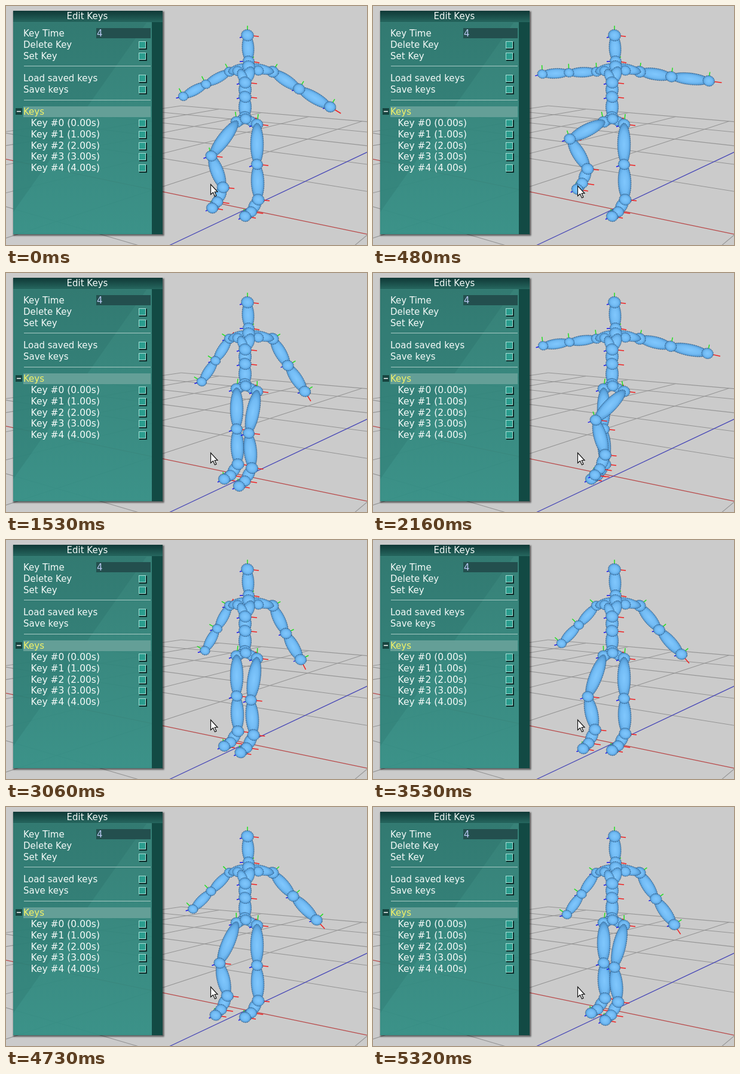
Animation, 604 px wide and 400 px high, one loop 5420 ms. Source, as an HTML page with a canvas:

```html
<!DOCTYPE html>
<html lang="en">
<head>
<meta charset="utf-8">
<title>Edit Keys</title>
<style>
  html, body { margin: 0; width: 100%; height: 100%; overflow: hidden; background: #cbcbcb; }
  canvas, svg { position: absolute; left: 0; top: 0; width: 604px; height: 400px; }
  text { font: 15px "DejaVu Sans", sans-serif; fill: #f4faf8; }
</style>
</head>
<body>
<canvas id="scene" width="604" height="400"></canvas>
<svg id="panel" viewBox="0 0 604 400">
  <defs>
    <linearGradient id="body" x2="0" y2="1">
      <stop offset="0" stop-color="#2f7c72"/><stop offset="1" stop-color="#348f85"/>
    </linearGradient>
    <linearGradient id="bar" x2="0" y2="1">
      <stop offset="0" stop-color="#0f3836"/><stop offset="1" stop-color="#26675f"/>
    </linearGradient>
    <filter id="soft"><feGaussianBlur stdDeviation="1.3"/></filter>
  </defs>
  <path d="M12 9H264.5V384.5H12Z M13 10V381H261V10Z" fill="#000" fill-rule="evenodd" opacity=".55" filter="url(#soft)"/>
  <rect x="12" y="8" width="250" height="374" fill="url(#body)" opacity=".95"/>
  <path d="M12 28H235L12 345Z" fill="#123c3a" opacity=".1"/>
  <rect x="244" y="27" width="18" height="355" fill="#124a44"/>
  <rect x="12" y="8" width="250" height="19" fill="url(#bar)"/>
  <rect x="151" y="37" width="91" height="17" fill="#234f4e"/>
  <path d="M30 100.5H242M30 157.5H242" stroke="#a9cbc5"/>
  <rect x="29" y="168" width="213" height="18" fill="#649f97"/>
  <rect x="16" y="171" width="11" height="11" fill="#17443f"/>
  <path d="M18 176.5H25" stroke="#fff" stroke-width="1.5"/>
</svg>
<script>
const panel = document.getElementById('panel');
const ctx = document.getElementById('scene').getContext('2d');

function add(tag, attrs, content = '') {
  const node = document.createElementNS(panel.namespaceURI, tag);
  for (const name in attrs) node.setAttribute(name, attrs[name]);
  node.textContent = content;
  panel.append(node);
}
const label = (x, y, content, style = '') => add('text', { x, y, style }, content);
function checkbox(y) {
  add('rect', { x: 223, y: y - 5, width: 13, height: 13, fill: '#0b2b29' });
  add('rect', { x: 222.5, y: y - 5.5, width: 11, height: 11, fill: '#2a9c8d', stroke: '#a5e0d6' });
}
label(101.5, 22, 'Edit Keys');
label(29, 51, 'Key Time');
label(152, 51, '4', 'fill:#b9c9f2');
label(29, 182, 'Keys', 'fill:#f3f266');
[['Delete Key', 65], ['Set Key', 84], ['Load saved keys', 121], ['Save keys', 140]].forEach(([name, y]) => {
  label(29, y + 5, name);
  checkbox(y);
});
for (let i = 0; i < 5; i++) {
  const y = 196 + i * 18.75;
  label(41.5, y + 5, `Key #${i} (${i}.00s)`, 'font-size:15.5px');
  checkbox(Math.round(y));
}

// Perspective floor: an origin and two vanishing points.
function floor(a, b) {
  const u = a * 0.132, v = b * 0.203, w = 1 + u + v;
  return [(402 - 936 * u + 985 * v) / w, (340 + 62 * u + 65 * v) / w];
}
function line(p, q, color, width = 1) {
  ctx.strokeStyle = color;
  ctx.lineWidth = width;
  ctx.beginPath();
  ctx.moveTo(...p);
  ctx.lineTo(...q);
  ctx.stroke();
}
function drawFloor() {
  ctx.fillStyle = '#cbcbcb';
  ctx.fillRect(0, 0, 604, 400);
  for (let i = -2; i <= 5; i++) {
    if (!i) continue;
    line(floor(i, 5), floor(i, -3), '#959595', 1.1);
    if (i > -2) line(floor(5, i), floor(-4, i), '#959595', 1.1);
  }
  line(floor(5, 0), floor(-4, 0), '#b84646', 1.2);
  line(floor(0, 5), floor(0, -3), '#4646b6', 1.2);
}

function ellipsoid(x, y, rx, ry, angle) {
  ctx.save();
  ctx.translate(x, y);
  ctx.rotate(angle);
  ctx.scale(rx, ry);
  const shade = ctx.createRadialGradient(0, 0, 0, 0, 0, 1);
  [[0, '#80c7fd'], [0.6, '#72bbf4'], [0.85, '#5ea6e0'], [1, '#4785bb']].forEach(s => shade.addColorStop(...s));
  ctx.beginPath();
  ctx.arc(0, 0, 1, 0, 7);
  ctx.fillStyle = shade;
  ctx.fill();
  ctx.restore();
  ctx.setLineDash([2, 1.3]);
  ctx.lineWidth = 1;
  ctx.strokeStyle = '#2b5278cc';
  ctx.stroke();
  ctx.setLineDash([]);
}
const ball = ([x, y], r) => ellipsoid(x, y, r + 1, r, 0.3);
function bone([x1, y1], [x2, y2], r) {
  ellipsoid((x1 + x2) / 2, (y1 + y2) / 2, Math.hypot(x2 - x1, y2 - y1) / 2 + 2, r, Math.atan2(y2 - y1, x2 - x1));
}
function axes([x, y], red = [19, 2], green = [0, -16], blue = [-13, 4]) {
  [[red, '#f02020'], [green, '#20e020'], [blue, '#1414f0']].forEach(([d, color]) =>
    line([x, y], [x + d[0], y + d[1]], color, 1.5));
}
const rad = degrees => degrees * Math.PI / 180;
const mix = (p, q, k, dx = 0, dy = 0) => [p[0] + (q[0] - p[0]) * k + dx, p[1] + (q[1] - p[1]) * k + dy];

function drawTorso() {
  const neck = [406, 92], collar = [406, 101], head = [404, 49];
  const spine = [[400, 128], [400, 152], [400, 186]];
  axes(head);
  [neck, collar].forEach(p => axes(p, [18, 3], [9, -7], [-15, 1]));
  spine.forEach(p => axes(p, [20, 2], [0, 0], [-14, 3]));
  bone(head, neck, 10);
  ball(head, 9.5);
  bone(collar, [374, 110], 8);
  bone(collar, [446, 110], 8);
  ball([388, 109], 8);
  ball([422, 108], 8);
  ball(neck, 8.5);
  ball(collar, 9.5);
  bone([411, 104], spine[0], 9.5);
  bone([391, 108], spine[0], 7.5);
  bone(spine[0], spine[1], 10.5);
  bone(spine[1], spine[2], 10.5);
  spine.forEach(p => ball(p, 9.5));
}

function drawArm(shoulder, side, elbowPolar, handPolar, r) {
  const at = ([deg, len]) => [shoulder[0] + side * len * Math.cos(rad(deg)), shoulder[1] + len * Math.sin(rad(deg))];
  const elbow = at(elbowPolar), hand = at(handPolar);
  const c = Math.cos(rad(handPolar[0])), s = Math.sin(rad(handPolar[0]));
  const reach = 16 + 6 * c;
  const along = side > 0 ? [reach * c, reach * s] : [13 * c, -13 * s];
  [shoulder, elbow, hand].forEach(p => axes(p, along, [15 * side * s, -15 * c], [-12, 3]));
  bone(shoulder, elbow, r);
  bone(elbow, hand, r);
  ball(shoulder, r - 0.5);
  ball(elbow, r - 1);
  ball(hand, r - 1);
}

// Each joint: rest x, y, then sine and cosine weights for x and for y.
function drawLeg(hip, joints, lift) {
  const s = Math.sin(rad(75 * lift)), q = 1 - Math.cos(rad(75 * lift));
  const [knee, ankle, toe] = joints.map(([x, y, ax, bx, ay, by]) => [x + ax * s + bx * q, y + ay * s + by * q]);
  const heel = mix(ankle, toe, 0.58, 1, 4);
  axes(hip, [19, 2], [2 - 6 * s, -17]);
  axes(knee, [19, 2], [-5 * s, -14]);
  axes(ankle, [19, 2], [0, 0], [0, 0]);
  axes(heel, [20, 3], [0, 0], [0, 0]);
  axes(toe, [18, 3], [-2, -12], [-11, 5]);
  ball(hip, 9);
  bone(hip, knee, 10.8);
  bone(knee, ankle, 10.8);
  ball(knee, 8.7);
  bone(ankle, heel, 9.5);
  ball(ankle, 9.2);
  bone(heel, toe, 8.5);
  ball(heel, 8.5);
  ball(toe, 8.7);
}
const legA = [[386, 261, -60, 0, 23.5, -90.5], [388, 320, -41, 14.5, 15, -92], [365, 345, -33.5, 12.7, 34, -105]];
const legB = [[420, 265, -50, -3, 20, -63], [422, 324, -38, 2, 17, -60], [400, 352, -38, 10, 26, -64]];

function drawCursor(x, y) {
  ctx.beginPath();
  [[0, 0], [0, 17], [4, 13.5], [7, 20], [9.5, 19], [6.7, 12.5], [11.5, 12.5]]
    .forEach(([dx, dy]) => ctx.lineTo(x + dx, y + dy));
  ctx.closePath();
  ctx.fillStyle = '#fff';
  ctx.fill();
  ctx.strokeStyle = '#111';
  ctx.lineWidth = 1.2;
  ctx.stroke();
}

// Pose updates come in bursts: first time, last time, count.
const loop = 5420, stride = 942.5, firstRest = 1317;
const bursts = [[0, 0, 1], [50, 590, 11], [660, 1190, 11], [1250, 1790, 11], [1860, 2370, 10], [2420, 2960, 11],
  [3000, 3530, 11], [3590, 4120, 10], [4160, 4660, 10], [4730, 5250, 11], [5320, 5320, 1]];
function poseTime(t) {
  const [start, end, count] = bursts.filter(b => b[0] <= t).pop();
  if (count === 1) return start;
  const step = (end - start) / (count - 1);
  return Math.min(end, start + Math.floor((t - start) / step + 0.01) * step);
}

function draw(t) {
  const beat = (t - firstRest) / stride;
  const cycle = ((beat % 4) + 4) % 4;
  const u = 1 - Math.abs(cycle % 2 - 1);
  const liftB = cycle < 2 ? u : 0, liftA = cycle < 2 ? 0 : u;
  drawFloor();
  drawArm([374, 110], -1, [73.8 - 76 * u, 43.5 + 3 * u * u], [73.2 - 75 * u, 85.5 + 6 * u * u], 8.3);
  drawArm([446, 110], 1, [75.5 - 70.6 * u, 51 + 3 * u], [73.6 - 70 * u, 96 + 38 * u - 17 * u * u], 9.8);
  drawTorso();
  bone([400, 188], [385, 195], 8);
  bone([400, 188], [420, 198], 8);
  drawLeg([386, 194], legA, liftA);
  drawLeg([420, 198], legB, liftB);
  ball([401, 189], 8.5);
  drawCursor(342.5, t < 50 ? 298.5 : 301);
}

const began = performance.now();
function tick() {
  draw(poseTime((performance.now() - began) % loop));
  requestAnimationFrame(tick);
}
tick();
</script>
</body>
</html>
```
